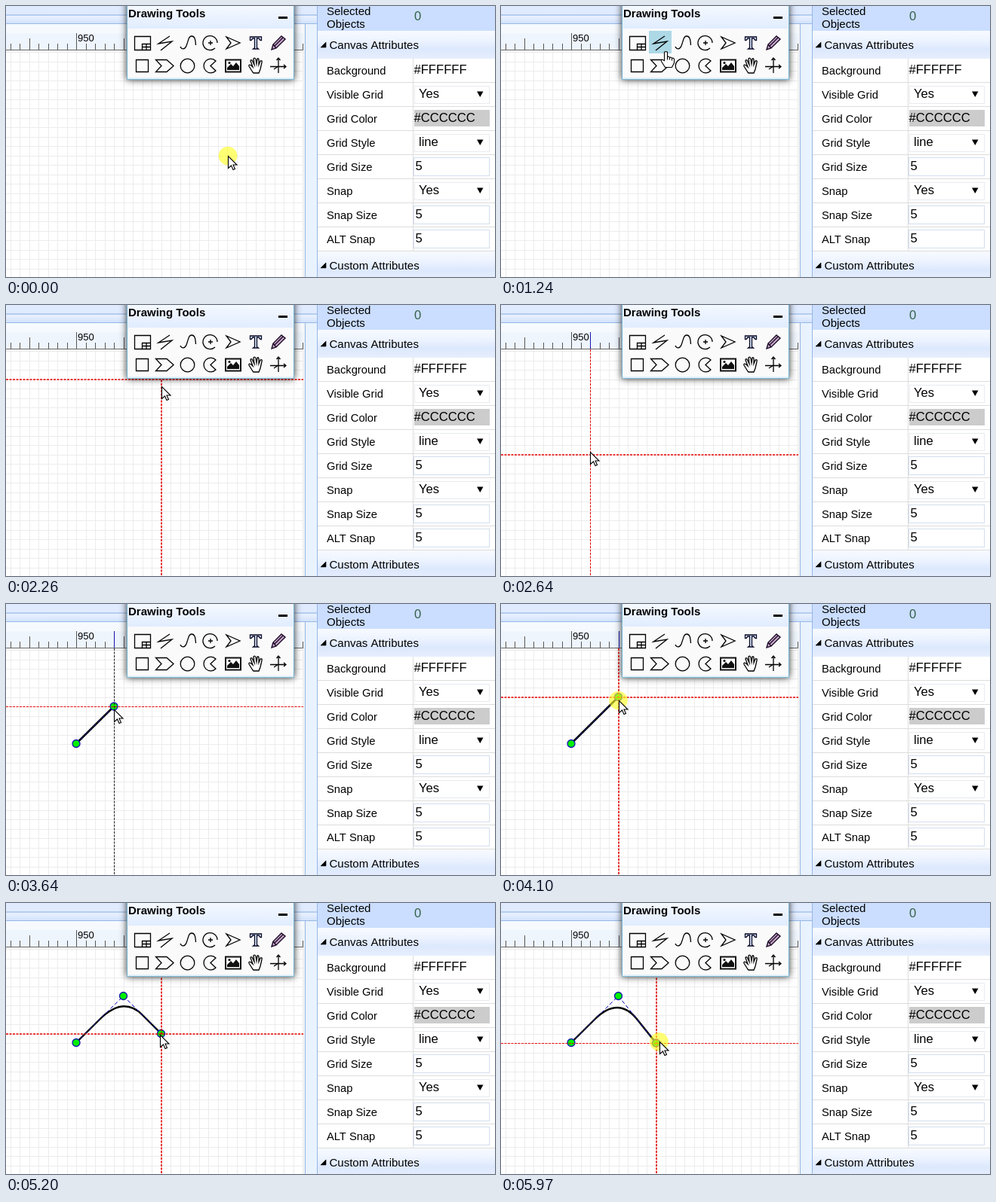
Animation of 648x360 px, one loop 8 s. Source, as an HTML page with a canvas:

```html
<!DOCTYPE html>
<html>
<head>
<meta charset="utf-8">
<style>
html, body { margin: 0; overflow: hidden; background: #fff; }
canvas { display: block; }
</style>
</head>
<body>
<canvas id="stage" width="648" height="360"></canvas>
<script>
const stage = document.getElementById('stage');
const FONT = '"Liberation Sans", Arial, sans-serif';
const LOOP = 8000, TICK = 77.43, START = 780, SNAP = 12.5;
let c;

function box(x, y, w, h, fill) {
  c.fillStyle = fill;
  c.fillRect(x, y, w, h);
}
function frame(x, y, w, h, color) {
  c.strokeStyle = color;
  c.lineWidth = 1;
  c.strokeRect(x + .5, y + .5, w - 1, h - 1);
}
function text(s, x, y, size = 15, weight = '', color = '#000') {
  c.font = `${weight} ${size}px ${FONT}`;
  c.fillStyle = color;
  c.fillText(s, x, y);
}
function path(d, { fill, stroke = '#000', width = 1.3, dash = [] } = {}) {
  const p = new Path2D(d);
  if (fill) { c.fillStyle = fill; c.fill(p); }
  if (stroke) {
    c.strokeStyle = stroke;
    c.lineWidth = width;
    c.setLineDash(dash);
    c.stroke(p);
    c.setLineDash([]);
  }
}
function disc(x, y, r, fill, stroke, width = 1.3) {
  c.beginPath();
  c.arc(x, y, r, 0, 7);
  if (fill) { c.fillStyle = fill; c.fill(); }
  if (stroke) { c.strokeStyle = stroke; c.lineWidth = width; c.stroke(); }
}
function shade(y, h, ...colors) {
  const g = c.createLinearGradient(0, y, 0, y + h);
  colors.forEach((color, i) => g.addColorStop(i / (colors.length - 1), color));
  return g;
}

function drawPage() {
  box(0, 0, 648, 360, '#fff');
  box(0, 0, 412, 11, '#e0ebff');
  box(0, 11, 412, 2, '#b4cdf0');
  box(0, 13, 412, 10, shade(13, 10, '#eaf2ff', '#d3e3fc'));
  box(0, 23, 412, 1, '#95b8e7');
  box(0, 24, 394, 12, '#f6faff');
  box(0, 36, 394, 22, '#eef5fd');
  box(168, 0, 1, 9, '#b0c4de');

  for (let x = 5.5; x < 394; x += SNAP) box(Math.round(x), 59, 1, 301, '#ececec');
  for (let y = 61; y < 360; y += SNAP) box(0, Math.round(y), 394, 1, '#ececec');
  for (let i = -7; i < 25; i++) {
    const h = i % 10 === 0 ? 22 : i % 5 === 0 ? 15 : 8;
    box(Math.round(93 + i * SNAP), 58 - h, 1, h, '#555');
  }
  text('950', 95, 47, 13);
  box(0, 58, 394, 1, '#666');

  box(394, 24, 2, 336, '#f4f4f4');
  box(396, 24, 1, 336, '#95b8e7');
  box(397, 24, 15, 336, '#e9f2ff');
  box(412, 0, 1, 360, '#95b8e7');
}

function drawHeader(label, y) {
  box(413, y, 235, 37, shade(y, 37, '#f7faff', '#eef4ff', '#dce8fd', '#e6eefc'));
  path(`M424 ${y + 15}V${y + 22}H417Z`, { fill: '#000', width: .6 });
  text(label, 428.5, y + 24);
}

function drawProperties() {
  box(413, 0, 235, 33, '#cbdeff');
  text('Selected', 425, 12);
  text('Objects', 425, 28.5);
  text('0', 541, 19, 16.6, '', '#35604a');
  drawHeader('Canvas Attributes', 33);

  const rows = [
    ['Background', '#FFFFFF'], ['Visible Grid', 'Yes', 'select'],
    ['Grid Color', '#CCCCCC', 'color'], ['Grid Style', 'line', 'select'],
    ['Grid Size', '5', 'input'], ['Snap', 'Yes', 'select'],
    ['Snap Size', '5', 'input'], ['ALT Snap', '5', 'input']
  ];
  rows.forEach(([label, value, kind], i) => {
    const y = 70 + i * 32;
    if (kind === 'color') box(541, y + 4, 100, 22, '#ccc');
    if (kind === 'select') {
      frame(541, y + 4, 100, 24, '#e8eaee');
      path(`M624 ${y + 11.5}h8.500l-4.250 7.500z`, { fill: '#000', stroke: '' });
    }
    if (kind === 'input') frame(540, y + 3, 101, 25, '#d3deee');
    text(label, 425, y + 21, 14.7);
    text(value, kind === 'select' ? 547 : kind === 'input' ? 542.5 : 540.5, y + 20, 16.6);
    box(413, y + 31, 235, 1, '#ddd');
  });
  box(539, 70, 1, 256, '#ddd');
  drawHeader('Custom Attributes', 326);
}

function drawTools(hover) {
  c.save();
  c.shadowColor = 'rgba(0,0,0,.8)';
  c.shadowBlur = 9;
  box(160, -10, 222, 108, '#7db5cf');
  c.restore();
  box(161, 0, 220, 97, '#e4f1fa');
  box(162, 0, 218, 30, shade(0, 30, '#f5f9ff', '#e0ecff'));
  box(162, 30, 218, 65, '#fafafa');
  text('Drawing Tools', 162, 15, 15, 'bold');
  box(361, 14, 12, 3, '#000');
  if (hover) box(hover, 33, 30, 30, '#add8e6');

  path('M170.5 40.5H191.5V58.5H170.5ZM180.5 58V50.5H191M180.5 54.5H191M186 50.5V58');
  path('M217 40L202 50L220 47L205 59');
  path('M231 54C233 58 237 58 239 53C242 45 242 40 246 40C250 40 251 44 251.500 52');
  path('M277 56A9.500 9.500 0 1 1 280 49M271 46V52M268 49H274');
  path('M292 41L310 49L292 57L298 49Z');
  path('M323.500 41H338.500V45.500H337L335 43H332.500V55.500L334.500 57H327.500L329.500 55.500V43H327L325 45.500H323.500Z',
    { fill: '#dbe9f8', stroke: '#0a0a28' });
  path('M352 58L354 51L365 40L370 44L358 56ZM354 51L358 56M356 53L367 42',
    { fill: '#c9a9c9', stroke: '#1a0a26', width: 1.4 });
  path('M172.500 71.500H188.500V87.500H172.500Z');
  path('M198.500 71.500H213L222 79.500L213 87.500H198.500L206 79.500Z');
  disc(240.5, 79.5, 9.3, '', '#000');
  path('M278 73A9.300 9.300 0 1 0 278 86L271 79.500Z');
  path('M291 71.500H311V87.500H291Z', { fill: '#fff', stroke: '#111', width: 2 });
  path('M293 85V82L298 77L301 80L305 75L309 80V85Z', { fill: '#111', stroke: '' });
  disc(296, 75.5, 1.6, '#111');
  path('M327 88L322 80Q321 77 325 79L327 81L324 73Q324 71 326 72L329 78L328 70Q330 68 331 71L332 77' +
    'L333 70Q335 69 335 72L335 78L337 73Q340 72 339 75L337 84L335 89H328Z', { fill: '#fff' });
  path('M361 69V89M350 80.500H371M358.500 72L361 69L363.500 72M368 78L371 80.500L368 83M355 84L361 80');
}

function drawCurve(points) {
  const [a, b, e] = points;
  const mid = (p, q) => `${(p[0] + q[0]) / 2} ${(p[1] + q[1]) / 2}`;
  if (e) path(`M${a}L${mid(a, b)}Q${b} ${mid(b, e)}L${e}`, { width: 2.4 });
  else if (b) path(`M${a}L${b}`, { width: 2.6 });
  if (b) path('M' + points.join('L'), { stroke: '#0000b8', width: 1, dash: [5, 3] });
  for (const [x, y] of points) disc(x, y, 5, '#00f000', '#1414b4');
}

function drawCrosshair(x, y) {
  const style = (v, black) =>
    ({ stroke: v === black ? '#222' : '#e60000', width: v % 1 ? 1.6 : 1, dash: [3, 1.5] });
  path(`M0 ${y + .5}H394`, style(y, 161));
  path(`M${x + .5} 59V360`, style(x, 143));
}

function drawPointer(x, y, hand) {
  c.save();
  c.translate(Math.round(x) + .5, Math.round(y) + .5);
  path(hand
    ? 'M-2 12V1Q0 -1 2 1V7Q4 6 5 8Q7 7 8 9Q10 8 11 10V15L8 21H-1L-6 13Q-7 10 -4 11ZM2 7V11M5 8V11M8 9V12'
    : 'M0 0V16L4 12.500L6.500 18L9 17L6.500 11.500H11.500Z', { fill: '#fff', width: 1.1 });
  c.restore();
}

// Pointer path: tick, x, y
const ROUTE = [
  [-1, 294, 199], [0, 292, 196], [2, 270, 160], [4, 235, 95], [6, 218, 60], [8, 217, 56],
  [9, 217, 56], [12, 234, 53], [15, 234, 53], [18, 222, 85], [20, 190, 130], [22, 150, 178],
  [24, 118, 195.4], [26, 100.5, 183.5], [34, 100.5, 183.5], [37, 143, 140], [39, 155.5, 128],
  [47, 155.5, 128], [51, 179, 170], [58, 208, 176], [60, 209, 183.2], [64, 209.5, 184.4], [999, 209.5, 184.4]
];
// Ticks between which a click is highlighted
const CLICKS = [[-99, 0], [14, 16], [29, 35], [43, 48], [67, 999]];

function pointerAt(n) {
  const i = Math.max(1, ROUTE.findIndex(k => k[0] >= n));
  const [t0, x0, y0] = ROUTE[i - 1], [t1, x1, y1] = ROUTE[i];
  const f = Math.max(0, (n - t0) / (t1 - t0));
  return [x0 + (x1 - x0) * f, y0 + (y1 - y0) * f];
}
const snap = (v, origin) => origin + Math.round((v - 3 - origin) / SNAP) * SNAP;

const page = document.createElement('canvas');
page.width = 648;
page.height = 360;
c = page.getContext('2d');
drawPage();
drawProperties();
c = stage.getContext('2d');

function render(now) {
  const n = Math.floor((now % LOOP - START) / TICK + .25);
  const [x, y] = pointerAt(n);
  const inTools = x > 160 && x < 382 && y < 98;
  const onIcons = inTools && y > 34 && y < 94;
  const hover = onIcons && y < 63 && (x < 226 ? 196 : x < 256 && 226);

  c.drawImage(page, 0, 0);
  if (n >= 16 && !inTools) {
    const target = [snap(x, 93), snap(y, 186)];
    const points = [];
    if (n >= 29) points.push([93, 185.5]);
    if (n >= 43) points.push([155.5, 123.5]);
    if (n >= 48 || n >= 35 && n < 43) points.push(target);
    drawCurve(points);
    drawCrosshair(...target);
    box(Math.round(x), 36, 1, 22, '#1414b4');
  }
  drawTools(hover);
  if (CLICKS.some(([from, to]) => n >= from && n < to)) disc(x, y, 12.3, 'rgba(255,255,30,.62)');
  drawPointer(x, y, onIcons);
}
const begin = performance.now();
function loop() {
  render(performance.now() - begin);
  requestAnimationFrame(loop);
}
loop();
</script>
</body>
</html>
```
